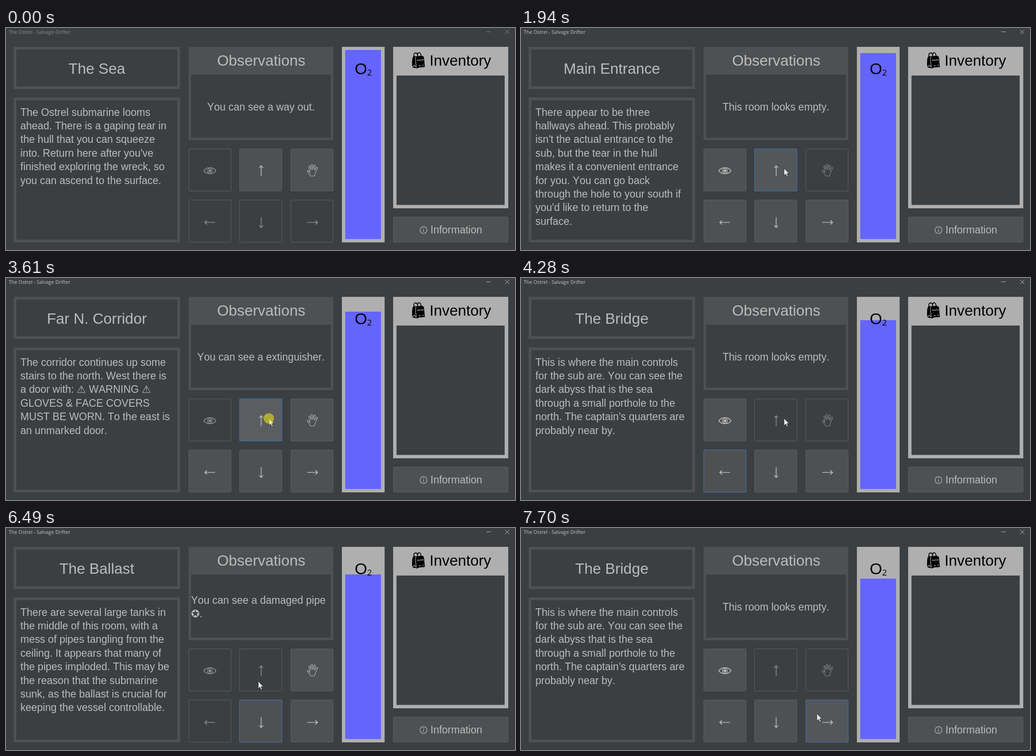
An HTML page that plays this animation: 1132x495 px, repeating every 8 s.

```html
<!DOCTYPE html>
<html lang="en">
<head>
<meta charset="utf-8">
<title>Salvage Drifter</title>
<style>
html, body { margin: 0; width: 100%; height: 100%; overflow: hidden; background: #3c3f41; }
svg { display: block; width: 1132px; height: 495px; }
text { font: 23px "Liberation Sans", Arial, "DejaVu Sans", sans-serif; font-kerning: none; fill: #bbb; white-space: pre; }
.big { font-size: 33.3px; }
.mid { text-anchor: middle; }
.ink { fill: #000; }
.bar { fill: #8b8d8e; stroke: #8b8d8e; }
.bar text { font: 11px "Open Sans", "Noto Sans", sans-serif; fill: inherit; stroke: none; }
.bar path { fill: none; stroke-width: 1; }
.active { fill: #c3c4c5; stroke: #c3c4c5; }
.frame { fill: none; stroke: #4e5052; stroke-width: 6; }
.btn rect { fill: #3c3f41; stroke: #5e6060; }
.btn g { fill: none; stroke: #8c8c8c; stroke-width: 1.7; }
.btn.on rect { fill: #4e5052; }
.btn.on g { stroke: #bbb; }
.btn.hover rect { fill: #53575a; }
.btn.down rect { fill: #5b5d61; }
.btn.focus rect { stroke: #3f6ca0; stroke-width: 1.5; }
</style>
</head>
<body>
<svg viewBox="0 0 1132 495">
  <g id="bar" class="bar">
    <text x="6" y="13">The Ostrel - Salvage Drifter</text>
    <path d="M1068 8.500h10M1110 4l9.500 9.500M1119.500 4l-9.500 9.500"/>
  </g>

  <rect class="frame" x="20" y="45" width="364" height="88"/>
  <text id="title" class="big mid" x="202" y="102"></text>
  <rect class="frame" x="20" y="158" width="364" height="317"/>
  <g id="story"></g>

  <path fill="#4e5052" d="M406 42h322v208h-322z"/>
  <path fill="#3c3f41" d="M411.500 104h311v140.500h-311z"/>
  <text class="big mid" x="567.500" y="84">Observations</text>
  <g id="notes"></g>

  <path fill="#afafaf" d="M747 42h95v436h-95z"/>
  <rect id="air" x="754.500" width="79.500" fill="#6464ff"/>
  <text class="ink" x="775.500" y="103" style="font-size:35.500px">O</text>
  <text class="ink" x="803" y="106" style="font:19px 'Open Sans',sans-serif">2</text>

  <path fill="#afafaf" d="M861 42h256v360h-256z"/>
  <path fill="#3c3f41" d="M868.500 106h240.500v288.500h-240.500z"/>
  <text class="big ink" x="942" y="84">Inventory</text>
  <g fill="none" stroke="#000" stroke-width="1.800">
    <path fill="#000" stroke="none" d="M904 67q2-6 8-4l14-1q4 1 4 8l1.500 17-13 1-4 2-10.500-2q-2-9 0-21z"/>
    <path d="M907 64q-1-8 4-8.500 4 0 5 8M915 62q0-7 4-7 4 1 4 8"/>
    <path stroke="#afafaf" stroke-width="1.300" d="M911.500 64q-2 6 1 22M914 72l15-1M904 87l4-4 5 5M918 84h4M926 83h3"/>
  </g>

  <g id="buttons"></g>

  <g id="pointer">
    <path fill="#eee" stroke="#222" stroke-width=".8" d="M0 0v16l3.700-3.500 2.500 5.800 2.500-1.100-2.500-5.700h4.800z"/>
    <circle id="press" cx="-.500" cy="0" r="11.500" fill="rgba(238,228,20,.58)"/>
  </g>
</svg>

<script>
const LOOP = 8000, TICK = 66.7;
const $ = id => document.getElementById(id);

const EMPTY = ["This room looks empty."];
// on: enabled buttons (Eye, Up, Hand, Left, Down, Right)
const rooms = {
  sea: { title: "The Sea", on: "UH", notes: ["You can see a way out."], story: [
    "The Ostrel submarine looms", "ahead. There is a gaping tear in", "the hull that you can squeeze",
    "into. Return here after you've", "finished exploring the wreck, so", "you can ascend to the surface."] },
  entrance: { title: "Main Entrance", on: "EULDR", notes: EMPTY, story: [
    "There appear to be three", "hallways ahead. This probably", "isn't the actual entrance to the",
    "sub, but the tear in the hull", "makes it a convenient entrance", "for you. You can go back",
    "through the hole to your south if", "you'd like to return to the", "surface."] },
  corridor: { title: "N. Corridor", on: "EULDR", notes: EMPTY, story: [
    "You are in a long corridor that", "runs to the north. There is a", "door to the west, and another",
    "door to the east. The entrance", "is back to the south."] },
  far: { title: "Far N. Corridor", on: "UHLDR", notes: ["You can see a extinguisher."], story: [
    "The corridor continues up some", "stairs to the north. West there is", "a door with: ⚠ WARNING ⚠",
    "GLOVES & FACE COVERS", "MUST BE WORN. To the east is", "an unmarked door."] },
  stairs: { title: "The Stairs", on: "EULDR", notes: EMPTY, story: [
    "The stairs lead up to the north,", "where you can see the bridge.", "There are doors to the west and",
    "to the east. The corridor is back", "to the south."] },
  bridge: { title: "The Bridge", on: "ELDR", notes: EMPTY, story: [
    "This is where the main controls", "for the sub are. You can see the", "dark abyss that is the sea",
    "through a small porthole to the", "north. The captain's quarters are", "probably near by."] },
  ballast: { title: "The Ballast", on: "HDR", notes: ["You can see a damaged pipe", "✪."], story: [
    "There are several large tanks in", "the middle of this room, with a", "mess of pipes tangling from the",
    "ceiling. It appears that many of", "the pipes imploded. This may be", "the reason that the submarine",
    "sunk, as the ballast is crucial for", "keeping the vessel controllable."] }
};

// start time, room, top of the air gauge, focused button
const visits = [
  [0, "sea", 49, ""], [1940, "entrance", 56, "U"], [2610, "corridor", 65.5, "U"],
  [3210, "far", 75, "U"], [3750, "stairs", 84.5, "U"], [4280, "bridge", 94, "L"],
  [5820, "ballast", 103.5, "D"], [7430, "bridge", 113, "R"]
];

const clicks = [[1870, 1940], [2410, 2610], [3080, 3210], [3610, 3750], [4150, 4280], [5760, 5820], [7370, 7430]];
const HELD = [3080, 3750];

// pointer moves: time, x, y
const moves = [
  [[190, 1010, 484], [330, 955, 440], [530, 820, 368], [730, 692, 306], [930, 636, 259], [1200, 602, 288], [1470, 585, 313]],
  [[4750, 592, 308], [4880, 643, 284], [5010, 708, 256], [5150, 640, 298], [5280, 490, 370], [5390, 346, 388], [5510, 430, 417], [5610, 471, 413]],
  [[5890, 473, 410], [6040, 487, 390], [6220, 499, 372]],
  [[6490, 561, 342], [6690, 598, 326], [6890, 616, 350], [7090, 637, 388], [7300, 659, 415]],
  [[7700, 658, 414], [8000, 658, 414]]
];

const arrow = turn => `<path transform="rotate(${turn})" d="M0 11.500V-11M-4.500-6.500L0-11.500 4.500-6.500"/>`;
const icons = {
  E: '<path d="M-13.500 0C-8-9.500 8-9.500 13.500 0 8 8.500-8 8.500-13.500 0z"/><circle r="5.500" stroke-width="1.400"/><circle r="1.800" stroke-width="2.800"/>',
  U: arrow(0), L: arrow(-90), D: arrow(180), R: arrow(90),
  H: '<path stroke-width="1.100" d="M-4 13C-6 8.500-9 6-11.500 2.500-12 .5-10 0-8.500 1.500L-5.500 5-8-8C-8-10-5.800-10.300-5.300-8.300L-3-1-2.600-11.500C-2.400-13.800.2-13.800.3-11.500L.6-1.200 3.600-10.500C4.300-12.500 6.600-11.800 6.200-9.700L4.200.5 8.800-5.800C10.200-7.400 12.200-6 11.200-4.200L7 5C6.500 8 5 10.500 4.500 13z"/>'
};

const buttons = [..."EUHLDR"].map((key, i) => {
  const col = i % 3, lower = i > 2;
  return { key, x: 406 + Math.floor(col * 113.75), y: lower ? 383 : 269, w: 95, h: 95,
    art: `<g transform="translate(${453.5 + col * 114} ${lower ? 433.5 : key === "H" ? 317 : 318.5})">${icons[key]}</g>` };
});
buttons.push({ key: "I", x: 861, y: 421, w: 256, h: 57,
  art: '<g style="stroke-width:1.300"><circle cx="928.500" cy="450.500" r="7.700"/><path d="M928.500 449v6M928.500 445.500v1.800"/></g><text x="944" y="458">Information</text>' });
$("buttons").innerHTML = buttons.map(b =>
  `<g class="btn"><rect x="${b.x + .5}" y="${b.y + .5}" width="${b.w - 1}" height="${b.h - 1}" rx="2"/>${b.art}</g>`).join("");
buttons.forEach((b, i) => b.el = $("buttons").children[i]);

const esc = s => s.replace(/&/g, "&amp;");
const lines = (list, x, y, cls = "") => list.map((s, i) =>
  `<text class="${cls}" x="${x}" y="${Math.round(y + i * 30.4)}">${esc(s)}</text>`).join("");

let shown = null;
function showVisit(visit) {
  if (visit === shown) return;
  shown = visit;
  const room = rooms[visit[1]], two = room.notes.length > 1;
  $("title").textContent = room.title;
  $("story").innerHTML = lines(room.story, 32, 195.5);
  $("notes").innerHTML = two ? lines(room.notes, 411.5, 169) : lines(room.notes, 567, 184, "mid");
  $("air").setAttribute("y", visit[2]);
  $("air").setAttribute("height", 470.5 - visit[2]);
}

const spline = (a, b, c, d, u) =>
  b + u / 2 * (c - a + u * (2 * a - 5 * b + 4 * c - d + u * (3 * (b - c) + d - a)));

function pointerAt(t) {
  const path = moves.filter(m => m[0][0] <= t).pop();
  if (!path) return null;
  const last = path.length - 1, t0 = path[0][0], t1 = path[last][0];
  if (t >= t1) return path[last].slice(1);
  const step = (t1 - t0) / Math.round((t1 - t0) / TICK);
  const time = t0 + Math.floor((t - t0) / step + .01) * step;
  let i = 0;
  while (i < last - 1 && path[i + 1][0] <= time) i++;
  const [a, b, c, d] = [i - 1, i, i + 1, i + 2].map(k => path[Math.max(0, Math.min(last, k))]);
  const u = (time - b[0]) / (c[0] - b[0]);
  return [1, 2].map(k => Math.round(spline(a[k], b[k], c[k], d[k], u)));
}

const within = (t, [from, to]) => t >= from && t < to;

function draw() {
  const t = performance.now() % LOOP;
  const visit = visits.filter(v => v[0] <= t).pop();
  showVisit(visit);

  const active = t >= clicks[0][0];
  $("bar").classList.toggle("active", active);

  const pos = pointerAt(t), clicking = clicks.some(c => within(t, c));
  $("pointer").style.display = pos ? "" : "none";
  $("press").style.display = clicking ? "" : "none";
  if (pos) $("pointer").setAttribute("transform", `translate(${pos})`);

  const focus = visit[3] || (active ? "U" : "");
  for (const b of buttons) {
    const on = b.key === "I" || rooms[visit[1]].on.includes(b.key);
    const over = on && pos && pos[0] >= b.x && pos[0] < b.x + b.w && pos[1] >= b.y && pos[1] < b.y + b.h;
    const down = over && (clicking || within(t, HELD));
    b.el.setAttribute("class", "btn" + (on ? " on" : "") + (over ? " hover" : "") +
      (down ? " down" : "") + (b.key === focus ? " focus" : ""));
  }
  requestAnimationFrame(draw);
}
draw();
</script>
</body>
</html>
```
